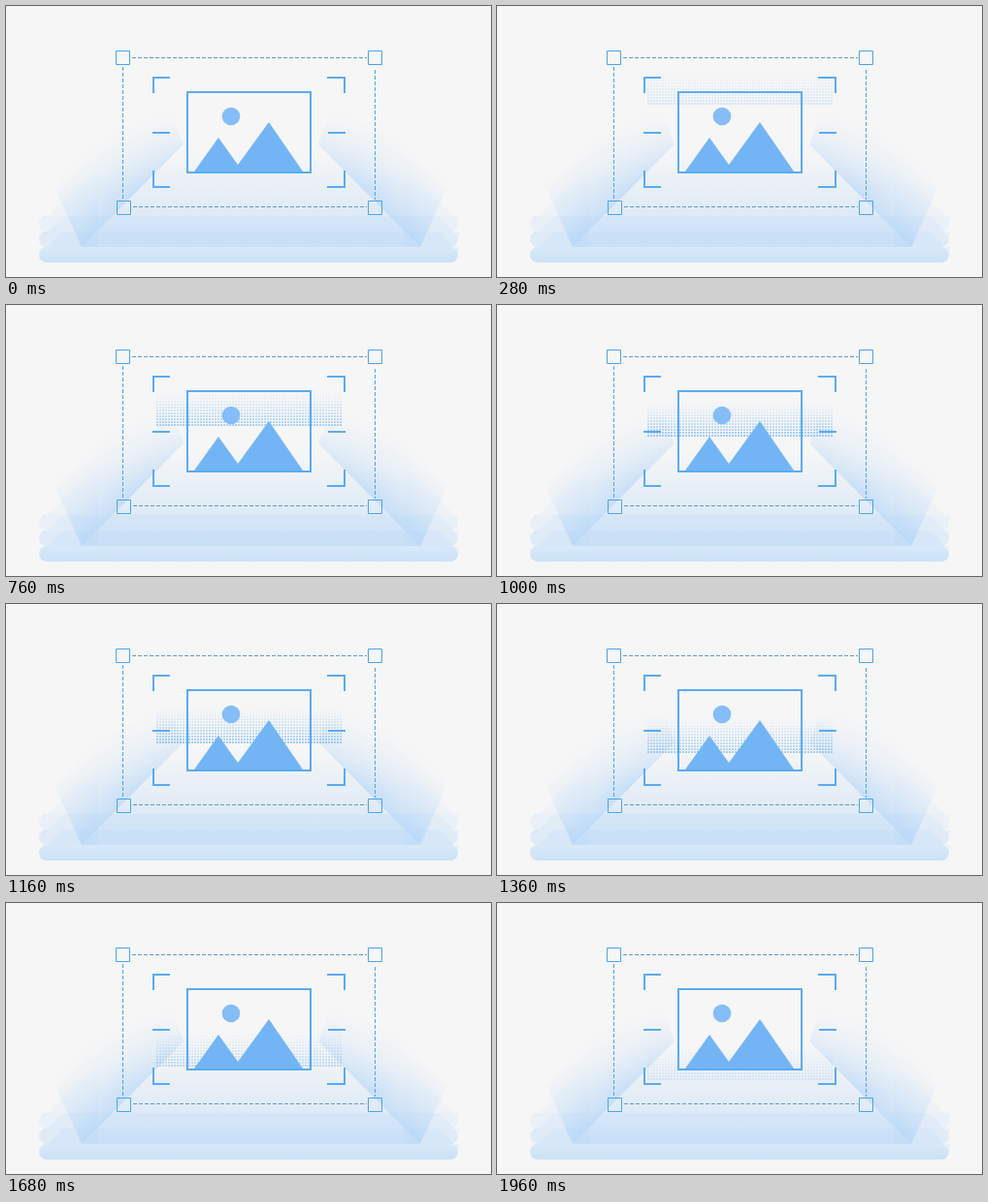
These frames come from a looping animation (500x280 px, 2000 ms). An HTML page:

```html
<!DOCTYPE html>
<html lang="en">
<head>
<meta charset="utf-8">
<title>Image scan</title>
<style>
  html, body { margin: 0; width: 100%; height: 100%; overflow: hidden; background: #f6f6f6; }
  svg { display: block; width: 500px; height: 280px; }
</style>
</head>
<body>
<svg viewBox="0 0 500 280">
  <defs>
    <linearGradient id="floor" gradientUnits="userSpaceOnUse" x1="0" y1="150" x2="0" y2="249">
      <stop offset="0" stop-color="#b4d6f8" stop-opacity="0"/>
      <stop offset="1" stop-color="#b4d6f8" stop-opacity=".55"/>
    </linearGradient>
    <linearGradient id="beamFill" gradientUnits="userSpaceOnUse" x1="131" y1="196" x2="84" y2="149">
      <stop offset="0" stop-color="#a9d0f7" stop-opacity=".62"/>
      <stop offset=".5" stop-color="#b4d6f8" stop-opacity=".3"/>
      <stop offset="1" stop-color="#b4d6f8" stop-opacity="0"/>
    </linearGradient>
    <linearGradient id="beamFade" gradientUnits="userSpaceOnUse" x1="0" y1="110" x2="0" y2="190">
      <stop offset="0" stop-color="#fff" stop-opacity="0"/>
      <stop offset="1" stop-color="#fff"/>
    </linearGradient>
    <mask id="beamMask" maskUnits="userSpaceOnUse" x="0" y="80" width="250" height="190">
      <rect y="80" width="250" height="190" fill="url(#beamFade)"/>
    </mask>
    <linearGradient id="wing" x1="0" y1="0" x2="0" y2="1">
      <stop offset="0" stop-color="#b4d6f8" stop-opacity="0"/>
      <stop offset="1" stop-color="#b4d6f8" stop-opacity=".22"/>
    </linearGradient>
    <linearGradient id="slab" x1="0" y1="0" x2="0" y2="1">
      <stop offset="0" stop-color="#d8e9f9"/>
      <stop offset="1" stop-color="#cbe1f6"/>
    </linearGradient>
    <g id="side">
      <path d="M38 222 L95 165 V217 H38Z M38 238 L95 181 V233 H38Z M38 254 L95 197 V249 H38Z" fill="url(#wing)"/>
      <path d="M78 249 L183 143 L169 105 L40 165Z" fill="url(#beamFill)" mask="url(#beamMask)"/>
    </g>
  </defs>

  <rect width="500" height="280" fill="#f6f6f6"/>
  <rect x="34" y="217" width="432" height="16" rx="8" fill="#b4d6f8" opacity=".2"/>
  <rect x="34" y="233" width="432" height="16" rx="8" fill="#b4d6f8" opacity=".34"/>
  <path d="M78 249 L183 143 H322 L427 249Z" fill="url(#floor)"/>
  <use href="#side"/>
  <use href="#side" transform="translate(505 0) scale(-1 1)"/>
  <rect x="34" y="249" width="432" height="16" rx="8" fill="url(#slab)"/>

  <g id="scan" fill="none" stroke="#6cb2f4" stroke-width="2" stroke-dasharray="2 1"></g>

  <g fill="none" stroke="#4aa3ec">
    <path d="M130 53.5 H372 M131 207.5 H372" stroke="#6299c9" stroke-dasharray="4 2"/>
    <path d="M120.5 63 V200 M380.5 66 V200" stroke-dasharray="4 2"/>
    <path d="M113.5 46.5 h14 v14 h-14Z M373.5 46.5 h14 v14 h-14Z M114.5 201.5 h14 v14 h-14Z M373.5 201.5 h14 v14 h-14Z"/>
  </g>
  <g fill="none" stroke="#5aabf2" stroke-width="2">
    <path d="M152 90 V74 H169 M331 74 H349 V90 M151 131 H169 M332 131 H350 M152 170 V187 H169 M331 187 H349 V170"/>
    <rect x="187" y="89" width="127" height="83"/>
  </g>
  <circle cx="232" cy="114" r="9.3" fill="#84bdf7"/>
  <path d="M194 171 L219 136 L244 171Z M234 171 L271 120 L306 171Z" fill="#73b5f4"/>
</svg>
<script>
  const LOOP = 2000, STEP = 40, START = 160, ROWS = 12, PITCH = 3;
  const scan = document.getElementById('scan');

  // Rows of dots fade out upwards from the leading bottom edge.
  for (let i = 0; i < ROWS; i++) {
    const row = document.createElementNS('http://www.w3.org/2000/svg', 'path');
    row.setAttribute('d', `M155 ${-1 - i * PITCH} h191`);
    row.setAttribute('opacity', ((ROWS - i) / ROWS) ** 1.2);
    scan.append(row);
  }

  function draw(time) {
    const t = Math.floor((time % LOOP) / STEP) * STEP;
    const bottom = Math.round(121 + (t - 680) * 27 / 560);
    const opacity = t < START ? 0 : 0.62 * Math.sin(Math.PI * t / 2200);
    scan.setAttribute('transform', `translate(0 ${bottom})`);
    scan.setAttribute('opacity', opacity);
  }

  const begin = performance.now();
  function tick() {
    draw(performance.now() - begin);
    requestAnimationFrame(tick);
  }
  tick();
</script>
</body>
</html>
```
